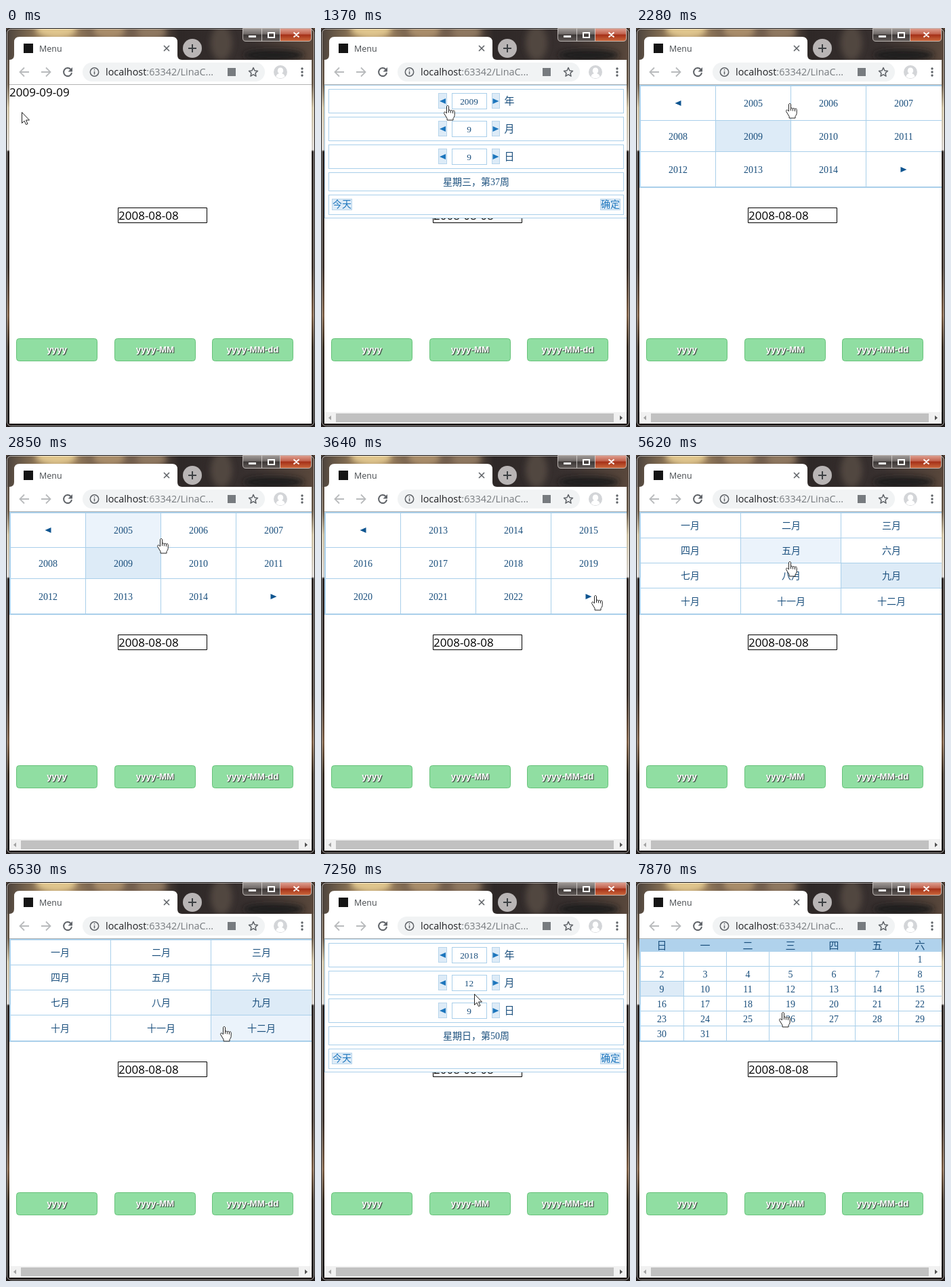
An HTML page for the animation above (8000 ms loop, 456 by 589 pixels).

```html
<!DOCTYPE html>
<html lang="zh">
<head>
<meta charset="utf-8">
<style>
html, body { margin: 0; width: 100%; height: 100%; overflow: hidden; }
svg { display: block; }
.ui { font-family: "Open Sans", "Noto Sans", sans-serif; }
.date { font: 17px "Open Sans", "Noto Sans", sans-serif; }
.btn { font: bold 13.333px "Liberation Sans", Arial, sans-serif; fill: #fff; text-anchor: middle; text-shadow: 1px 1px 1px #333; }
.cal { font-family: "Liberation Serif", "Noto Sans CJK SC", "Noto Sans CJK", serif; font-size: 14px; fill: #1a4f7d; text-anchor: middle; }
.line { fill: none; stroke: #a9cfea; }
</style>
</head>
<body>
<svg width="456" height="589" viewBox="0 0 456 589">
  <defs>
    <linearGradient id="top">
      <stop offset="0" stop-color="#4b423c"/><stop offset=".1" stop-color="#8d7556"/>
      <stop offset=".2" stop-color="#a18560"/><stop offset=".3" stop-color="#6d5a4a"/>
      <stop offset=".45" stop-color="#75604f"/><stop offset=".56" stop-color="#2e2827"/>
      <stop offset=".8" stop-color="#38302f"/><stop offset="1" stop-color="#5a483c"/>
    </linearGradient>
    <linearGradient id="side" x2="0" y2="1">
      <stop offset="0" stop-color="#544840"/><stop offset=".14" stop-color="#6b5c4c"/>
      <stop offset=".2" stop-color="#cfc3a6"/><stop offset=".305" stop-color="#d8d4d0"/>
      <stop offset=".31" stop-color="#2b2523"/><stop offset=".6" stop-color="#3a302a"/>
      <stop offset=".72" stop-color="#7d6047"/><stop offset=".8" stop-color="#33291f"/>
      <stop offset="1" stop-color="#1d1918"/>
    </linearGradient>
    <linearGradient id="glass" x2="0" y2="1">
      <stop offset="0" stop-color="#a29c99"/><stop offset=".45" stop-color="#6f6967"/>
      <stop offset=".5" stop-color="#3c3736"/><stop offset="1" stop-color="#625b58"/>
    </linearGradient>
    <linearGradient id="red" x2="0" y2="1">
      <stop offset="0" stop-color="#dfa193"/><stop offset=".45" stop-color="#c2614c"/>
      <stop offset=".5" stop-color="#a42f17"/><stop offset="1" stop-color="#cc6a3e"/>
    </linearGradient>
    <filter id="soft"><feGaussianBlur stdDeviation="4"/></filter>
    <clipPath id="bar"><path d="M0 0H456V47H0Z"/></clipPath>
    <clipPath id="page"><path d="M5 84H451V584H5Z"/></clipPath>
  </defs>

  <path fill="url(#side)" d="M0 0H456V589H0Z"/>
  <g clip-path="url(#bar)">
    <path fill="url(#top)" d="M0 0H456V47H0Z"/>
    <g filter="url(#soft)">
      <ellipse cx="74" cy="2" rx="30" ry="13" fill="#e0c68e"/>
      <ellipse cx="152" cy="4" rx="24" ry="12" fill="#a98d6b"/>
      <ellipse cx="215" cy="6" rx="22" ry="10" fill="#8f7860"/>
      <ellipse cx="318" cy="22" rx="16" ry="26" fill="#514640"/>
      <ellipse cx="395" cy="40" rx="45" ry="8" fill="#1f1b1c"/>
    </g>
  </g>
  <path fill="#231d1b" d="M0 584H456V589H0Z"/>
  <rect x="1.5" y="1.5" width="453" height="586" rx="6" fill="none" stroke="#fff" stroke-opacity=".6"/>
  <rect x=".5" y=".5" width="455" height="588" rx="6" fill="none" stroke="#171515"/>

  <g stroke="#d5d0cd" stroke-opacity=".8">
    <path fill="url(#glass)" d="M349.5 .5H377.500V19.500H354Q349.500 19.500 349.500 15Z"/>
    <path fill="url(#glass)" d="M377.500 .5H404.500V19.500H377.500Z"/>
    <path fill="url(#red)" d="M404.500 .5H450.500V15Q450.500 19.500 446 19.500H404.500Z"/>
  </g>
  <g fill="none" stroke="#fff">
    <path stroke-width="3" d="M358 12.500H369"/>
    <path stroke-width="2" d="M387 7H396V14H387ZM424.500 6.500L432.500 13.500M432.500 6.500L424.500 13.500"/>
  </g>

  <path fill="#fff" d="M5 47Q12 47 12 40V21Q12 13 20 13H245Q253 13 253 21V40Q253 47 260 47H451V584H5Z"/>
  <path fill="#151515" d="M26 23H40V37H26Z"/>
  <text class="ui" x="49" y="35" font-size="12.5" fill="#45494d">Menu</text>
  <circle cx="275" cy="30" r="14" fill="#b9b5b5"/>
  <g fill="none" stroke="#5f6368" stroke-width="1.6">
    <path d="M233 26L241 34M241 26L233 34"/>
    <path stroke="#3c4043" stroke-width="2" d="M269 30H281M275 24V36"/>
    <path stroke="#b9bbbd" stroke-width="1.8" d="M34 65H21M27 58.500L20.500 65L27 71.500M52 65H65M59 58.500L65.500 65L59 71.500"/>
    <path stroke-width="2" d="M95.500 61A6 6 0 1 0 97 66"/>
  </g>
  <path fill="#5f6368" d="M98 58V64.500H91.500Z"/>
  <rect x="113" y="51" width="269" height="28" rx="14" fill="#f1f3f4"/>
  <g fill="none" stroke="#5f6368" stroke-width="1.5">
    <circle cx="130.500" cy="65" r="6.200"/>
    <path d="M130.500 64V68.500M130.500 61V62.600"/>
    <path stroke-linejoin="round" d="M365 58.500L367 63L371.500 63.400L368 66.600L369 71.200L365 68.700L361 71.200L362 66.600L358.500 63.400L363 63Z"/>
  </g>
  <text class="ui" x="147" y="70" font-size="14.400" fill="#202124">localhost<tspan fill="#777b7f">:63342/LinaC...</tspan></text>
  <path fill="#777b7f" d="M327 59H339V71H327Z"/>
  <circle cx="405" cy="65" r="10" fill="#d3d5d8"/>
  <path fill="#fff" d="M405 58.500A4 4.500 0 0 1 407 67Q411 68 411.500 72Q405 76.500 398.500 72Q399 68 403 67A4 4.500 0 0 1 405 58.500Z"/>
  <g fill="#5f6368"><circle cx="437" cy="60" r="1.700"/><circle cx="437" cy="65" r="1.700"/><circle cx="437" cy="70" r="1.700"/></g>
  <path stroke="#b4b4b4" d="M5 83.500H451"/>

  <text class="date" x="5" y="101">2009-09-09</text>
  <path fill="#fff" stroke="#000" d="M165.500 265.500H296.500V287.500H165.500Z"/>
  <text class="date" x="166" y="283">2008-08-08</text>
  <g id="buttons"></g>
  <g id="live" clip-path="url(#page)"></g>
</svg>
<script>
const LOOP = 8000;
const $ = id => document.getElementById(id);
const text = (x, y, s, attr = '') => `<text class="cal" x="${x}" y="${y}" ${attr}>${s}</text>`;
const rect = (x, y, x2, y2, attr) => `<rect x="${x}" y="${y}" width="${x2 - x}" height="${y2 - y}" ${attr}/>`;
const tri = (x, y, dir, h, fill) =>
  `<path fill="${fill}" d="M${x - 4.5 * dir} ${y - h}L${x + 4.5 * dir} ${y}L${x - 4.5 * dir} ${y + h}Z"/>`;

$('buttons').innerHTML = [[15, 'yyyy'], [160, 'yyyy-MM'], [304, 'yyyy-MM-dd']].map(([x, s]) =>
  rect(x + .5, 458.5, x + 119.5, 491.5, 'rx="4" fill="#90dea2" stroke="#67c27a"') +
  `<text class="btn" x="${x + 60}" y="479">${s}</text>`).join('');

// Pointer moves: start, end, number of steps, destination
const moves = [
  [80, 230, 3, 48, 97], [400, 730, 5, 47, 97], [900, 1370, 8, 186, 114], [1450, 1660, 3, 255, 109],
  [1730, 1800, 2, 263, 109], [1860, 2050, 3, 225, 105], [2280, 2370, 2, 227, 116], [2850, 2850, 1, 228, 123],
  [2930, 3240, 5, 404, 205], [3540, 3640, 2, 404, 207], [3870, 4150, 5, 290, 160], [4370, 4730, 5, 237, 158],
  [4810, 5130, 5, 221, 142], [5520, 5750, 4, 230, 172], [5900, 6530, 8, 321, 213], [6600, 6680, 2, 330, 215],
  [6850, 7100, 4, 233, 174], [7250, 7330, 2, 219, 155], [7500, 7630, 3, 216, 192]
];

function pointer(t) {
  let x = 23, y = 124;
  for (const [start, end, n, toX, toY] of moves) {
    if (t < start) break;
    const step = Math.min(n, Math.floor((t - start) / (end - start || 1) * (n - 1) + 1e-6) + 1);
    x += (toX - x) * step / n;
    y += (toY - y) * step / n;
  }
  return [Math.round(x), Math.round(y)];
}

const blue = '#1d76bd', pale = 'fill="#ddebf7"';
const fieldY = [108, 149, 190];

function panel(year, month, day, week) {
  let s = rect(5.5, 84.5, 451.5, 280.5, 'fill="#fff" stroke="#a9cfea"');
  for (const [a, b] of [[90, 125], [131, 166], [172, 207], [213, 240], [246, 275]])
    s += rect(11.5, a + .5, 446.5, b + .5, 'class="line"');
  [[year, '年'], [month, '月'], [day, '日']].forEach(([value, unit], i) => {
    const y = fieldY[i];
    s += rect(173.5, y - 11.5, 185.5, y + 10.5, pale + ' stroke="#b7d5ec"') + tri(179.5, y, -1, 4, blue) +
      rect(193.5, y - 11.5, 244.5, y + 11.5, 'class="line"') + text(218.5, y + 5, value, 'style="font-size:13.333px"') +
      rect(252.5, y - 11.5, 263.5, y + 10.5, pale + ' stroke="#b7d5ec"') + tri(258, y, 1, 4, blue) +
      text(278, y + 5, unit, 'style="font-size:15px"');
  });
  s += text(229, 232, week);
  for (const [x, label] of [[31, '今天'], [427, '确定']])
    s += rect(x - 14.5, 252.5, x + 14.5, 268.5, pale + ' stroke="#b7d5ec"') +
      text(x, 265, label, `style="fill:${blue}"`);
  return s;
}

function grid(xs, ys, labels, selected, tip) {
  const cols = xs.length - 1;
  let s = rect(5, 84, 451, 236, 'fill="#fff"');
  labels.forEach((label, i) => {
    const c = i % cols, r = Math.floor(i / cols);
    const x = xs[c], x2 = xs[c + 1], y = ys[r], y2 = ys[r + 1];
    const hover = tip && tip[0] >= x && tip[0] < x2 && tip[1] >= y && tip[1] < y2;
    if (i === selected || hover) s += rect(x, y, x2, y2, `fill="${i === selected ? '#ddebf7' : '#ebf3fb'}"`);
    const cx = Math.round((x + x2) / 2), cy = Math.round((y + y2) / 2);
    if (label === '<' || label === '>') s += tri(cx, cy, label === '<' ? -1 : 1, 4, '#0f5590');
    else s += text(cx, cy + 5, label);
  });
  const inner = xs.slice(1, -1).map(x => `M${x} ${ys[0]}V235`).join('') + ys.slice(1, -1).map(y => `M6 ${y}H451`).join('');
  return s + `<path class="line" d="${inner}"/><path class="line" stroke-width="2" d="M451 85H6V235H451"/>`;
}

const years = (first, selected, tip) => grid([6, 117.5, 228.5, 339.5, 451], [86, 136.5, 182.5, 235],
  ['<', ...Array.from({ length: 10 }, (_, i) => first + i), '>'], selected, tip);

const months = tip => grid([6, 154.5, 302.5, 451], [86, 122.5, 159.5, 196.5, 235],
  [...'一二三四五六七八九十', '十一', '十二'].map(m => m + '月'), 8, tip);

function days() {
  const xs = [6, 70.5, 133.5, 196.5, 259.5, 323.5, 387.5, 451];
  const labels = Array.from({ length: 42 }, (_, i) => i > 5 && i < 37 ? i - 5 : '');
  return grid(xs, [103, 124.5, 146.5, 168.5, 190.5, 212.5, 235], labels, 14) +
    rect(5, 84, 451, 103, 'fill="#b0d2ec"') +
    [...'日一二三四五六'].map((d, i) => text(Math.round((xs[i] + xs[i + 1]) / 2), 99, d, 'style="font-size:15px"')).join('');
}

// Each view: start, time from which cells react to the pointer, drawing
const views = [
  [0, 0, () => ''],
  [400, 400, () => panel(2009, 9, 9, '星期三，第37周')],
  [2280, 2370, tip => years(2005, 5, tip)],
  [3540, 3870, tip => years(2013, -1, tip)],
  [4370, 4370, () => panel(2018, 9, 9, '星期日，第37周')],
  [5200, 5520, months],
  [6850, 6850, () => panel(2018, 12, 9, '星期日，第50周')],
  [7800, 7800, days]
];
const panels = [1, 4, 6];

const scrollbar = rect(5, 567, 451, 584, 'fill="#f1f1f1"') + rect(22, 569, 432, 582, 'fill="#c1c1c1"') +
  '<path fill="#a3a3a3" d="M15 572V579L11 575.5Z"/><path fill="#505050" d="M441 572V579L445 575.5Z"/>';

const overControl = (x, y) =>
  [[173, 186], [193, 245], [252, 264]].some(([a, b]) => x >= a && x <= b) &&
  fieldY.some(c => Math.abs(y - c) <= 12);

const arrow = '<path fill="#fff" stroke="#222" d="M.5 .5V16.5L4 13L6.5 18.500L9 17.500L6.500 12H11.500Z"/>';
const hand = '<g transform="translate(-5)" fill="#fff" stroke="#222"><path d="M6 .5C5 .5 4.500 1.200 4.500 2V12L2.900 10.400C2.100 9.600 .5 10.100 .5 11.400C.5 12 .8 12.400 1.100 12.900L5.100 19.500V22H14V19.500C15.200 17.800 16.200 16.500 16.200 14.500V9.500C16.200 7.500 13.600 7.500 13.400 9.100C13.400 7.100 10.500 6.800 10.400 8.700C10.400 6.700 7.600 6.500 7.500 8.400V2C7.500 1.200 7 .5 6 .5Z"/><path d="M7.500 8V11M10.400 8.500V11.500M13.400 9V12"/></g>';

let shown;
function frame(now) {
  const t = now % LOOP;
  const at = views.filter(v => v[0] <= t).length - 1;
  const [, reactFrom, draw] = views[at];
  const [x, y] = pointer(t);
  const pointing = panels.includes(at) ? overControl(x, y) : at > 0;
  const out = (at ? scrollbar : '') + draw(t >= reactFrom ? [x, y] : null) +
    `<g transform="translate(${x} ${y})">${pointing ? hand : arrow}</g>`;
  if (out !== shown) $('live').innerHTML = shown = out;
  requestAnimationFrame(frame);
}
requestAnimationFrame(frame);
</script>
</body>
</html>
```
